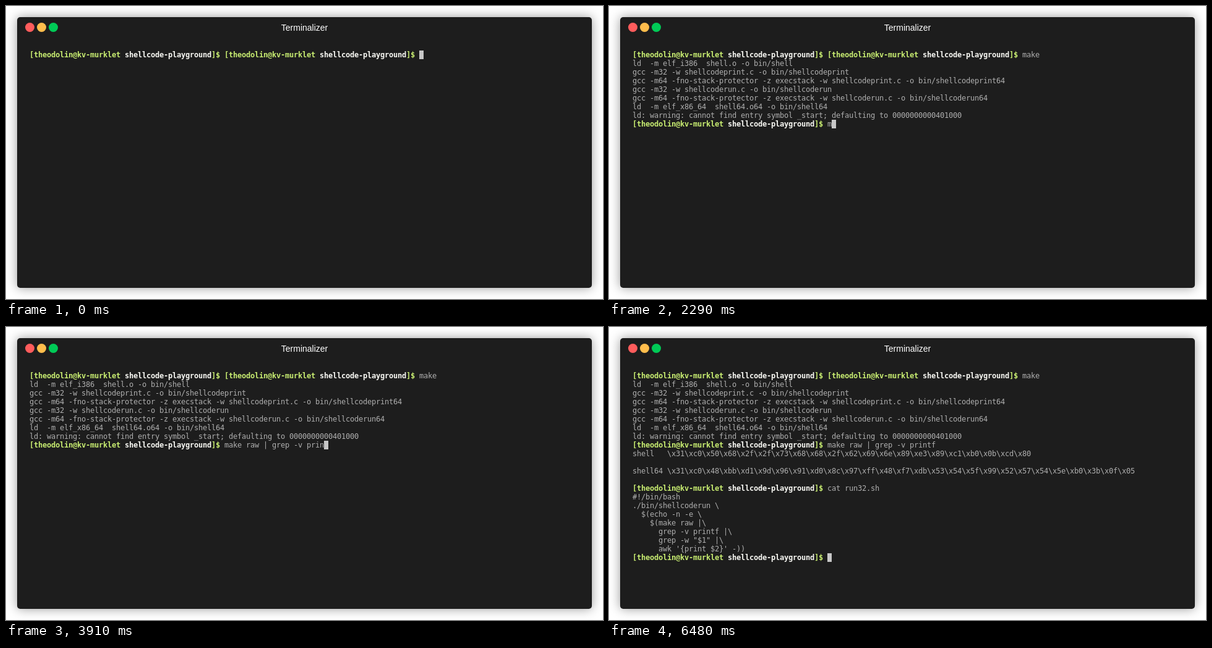
Animation, 965 px wide and 474 px high, one loop 8000 ms. Source, as an HTML page with a canvas:

```html
<!DOCTYPE html>
<html lang="en">
<head>
<meta charset="utf-8">
<title>Terminal session</title>
<style>
html, body { margin: 0; width: 100%; height: 100%; overflow: hidden; background: #fff; }
canvas { display: block; }
</style>
</head>
<body>
<canvas id="stage" width="965" height="474"></canvas>
<script>
const ctx = document.getElementById('stage').getContext('2d');
const LOOP = 8000;
const CELL = { x: 38, y: 72, w: 7, h: 14, base: 11 };
const MONO = "12px 'DejaVu Sans Mono', monospace";
const COLOR = {
  window: '#1d1d1d', text: '#afafaf', cursor: '#c7c7c7',
  user: '#c8ed71', dir: '#f9f9f4', title: '#ffffff'
};

const USER = '[theodolin@kv-murklet';
const DIR = ' shellcode-playground';
const PROMPT = USER + DIR + ']$ ';

const hex = bytes => bytes.split(' ').map(b => '\\x' + b).join('');
const SHELL = 'shell   ' + hex('31 c0 50 68 2f 2f 73 68 68 2f 62 69 6e 89 e3 89 c1 b0 0b cd 80');
const SHELL64 = 'shell64 ' + hex('31 c0 48 bb d1 9d 96 91 d0 8c 97 ff 48 f7 db 53 54 5f 99 52 57 54 5e b0 3b 0f 05');

const SCRIPT = String.raw`
#!/bin/bash
./bin/shellcoderun \
  $(echo -n -e \
    $(make raw |\
      grep -v printf |\
      grep -w "$1" |\
      awk '{print $2}' -))
`;

// Each event appends text to the screen at its time.
const events = [];
function emit(start, end, pieces) {
  const gap = pieces.length > 1 ? (end - start) / (pieces.length - 1) : 0;
  pieces.forEach((text, i) => events.push({ time: Math.round(start + i * gap), text }));
}

emit(0, 0, [PROMPT + PROMPT]);
emit(500, 990, [
  ...'make', '\n',
  'ld  -m elf_i386  shell.o -o bin/shell\ngcc -m32 -w shellcodeprint.c -o bin/shellcodeprint\n',
  'gcc -m64 -fno-stack-protector -z execstack -w shellcodeprint.c -o bin/shellcodeprint64\n',
  'gcc -m32 -w shellcoderun.c -o bin/shellcoderun\n',
  'gcc -m64 -fno-stack-protector -z execstack -w shellcoderun.c -o bin/shellcoderun64\n',
  'ld  -m elf_x86_64  shell64.o64 -o bin/shell64\n',
  'ld: warning: cannot find entry symbol _start; defaulting to 0000000000401000\n' + PROMPT
]);
emit(2290, 2510, [...'make ']);
emit(2670, 2670, ['r']);
emit(2720, 3310, [...'aw | grep ']);
emit(3410, 3410, ['-']);
emit(3510, 4270, [...'v printf', '\n', SHELL + '\n\n', SHELL64 + '\n\n' + PROMPT]);
emit(5070, 5280, [...'cat ']);
emit(5380, 5680, [...'run32', '.sh ']);
emit(6480, 6480, [SCRIPT + PROMPT]);

function drawWindow() {
  ctx.fillStyle = '#fff';
  ctx.fillRect(0, 0, 965, 474);
  ctx.save();
  ctx.shadowColor = 'rgba(0, 0, 0, 0.4)';
  ctx.shadowBlur = 18;
  ctx.fillStyle = COLOR.window;
  ctx.beginPath();
  ctx.roundRect(18, 18, 929, 438, 5);
  ctx.fill();
  ctx.restore();

  ['#ff5c5c', '#ffbd4c', '#00ca56'].forEach((color, i) => {
    ctx.fillStyle = color;
    ctx.beginPath();
    ctx.arc(38.5 + 19 * i, 34.5, 7.5, 0, 2 * Math.PI);
    ctx.fill();
  });

  ctx.fillStyle = COLOR.title;
  ctx.font = "14px 'Liberation Sans', Arial, sans-serif";
  ctx.textAlign = 'center';
  ctx.fillText('Terminalizer', 482.5, 40);
  ctx.textAlign = 'left';
}

// Draws cell by cell and returns the next column.
function drawText(text, col, row, color, bold) {
  ctx.fillStyle = color;
  ctx.font = (bold ? 'bold ' : '') + MONO;
  for (const ch of text) {
    if (ch !== ' ') ctx.fillText(ch, CELL.x + col * CELL.w, CELL.y + row * CELL.h + CELL.base);
    col++;
  }
  return col;
}

function drawLine(line, row) {
  let col = 0;
  while (line.startsWith(PROMPT)) {
    col = drawText(USER, col, row, COLOR.user, true);
    col = drawText(DIR, col, row, COLOR.dir, true);
    col = drawText(']$ ', col, row, COLOR.user, true);
    line = line.slice(PROMPT.length);
  }
  return drawText(line, col, row, COLOR.text, false);
}

function drawScreen(count) {
  drawWindow();
  const lines = events.slice(0, count).map(e => e.text).join('').split('\n');
  let col = 0;
  lines.forEach((line, row) => { col = drawLine(line, row); });
  ctx.fillStyle = COLOR.cursor;
  ctx.fillRect(CELL.x + col * CELL.w, CELL.y + (lines.length - 1) * CELL.h, CELL.w, CELL.h);
}

const origin = performance.now();
let shown = 0;
function tick() {
  const t = (performance.now() - origin) % LOOP;
  const count = events.filter(e => e.time <= t).length;
  if (count !== shown) drawScreen(shown = count);
  requestAnimationFrame(tick);
}
tick();
</script>
</body>
</html>
```
